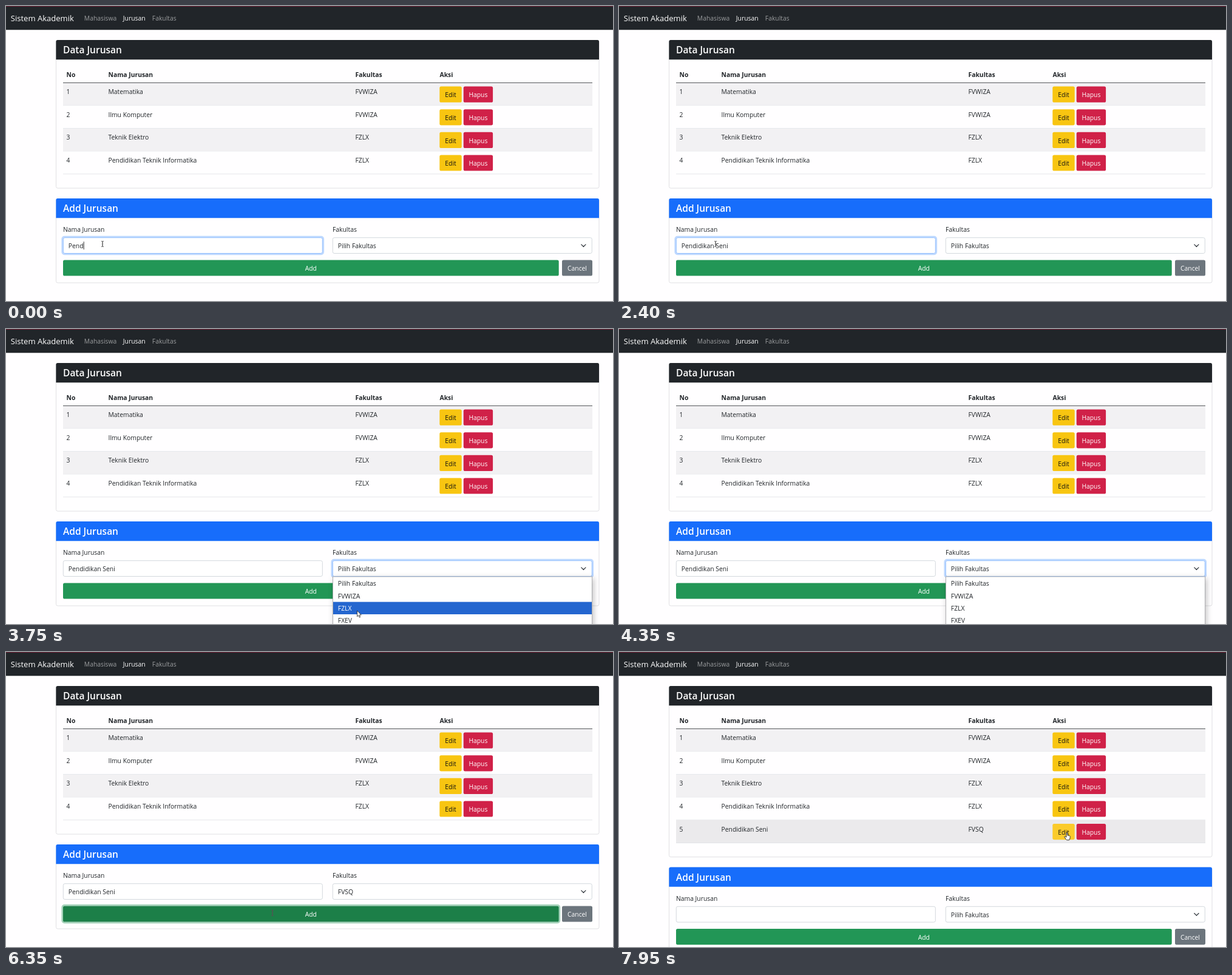
An HTML page for the animation above (8 s loop, 1000 px wide and 486 px high).

```html
<!DOCTYPE html>
<html lang="id">
<head>
<meta charset="utf-8">
<title>Sistem Akademik</title>
<style>
html, body { margin: 0; width: 100%; height: 100%; overflow: hidden; background: #fffeff; }
svg { display: block; font: 10.35px "Open Sans", "Noto Sans", sans-serif; fill: #212529; }
.menu { filter: drop-shadow(2px 3px 5px rgba(0, 0, 0, .25)); }
</style>
</head>
<body>
<svg id="stage" width="1000" height="486" viewBox="0 0 1000 486"></svg>
<script>
const LOOP = 8000;
const ROW = 37.6;
const TYPED = 'Pendidikan Seni';
const PROMPT = 'Pilih Fakultas';
const FACULTIES = [PROMPT, 'FVWIZA', 'FZLX', 'FXEV', 'FVSQ'];
const MAJORS = [
  ['Matematika', 1], ['Ilmu Komputer', 1], ['Teknik Elektro', 2],
  ['Pendidikan Teknik Informatika', 2], [TYPED, 4]
];

// Moments of the interaction, in ms
const OPEN = 3200, CHOOSE = 4650, SUBMIT = 5850, RELOAD = 6400;

// Pointer path: time, x, y
const PATH = [
  [0, 159, 392], [2550, 159, 392], [3150, 640, 396], [3350, 625, 402],
  [3700, 578.5, 464], [4050, 578.5, 464], [4500, 575, 502], [4700, 575, 502],
  [5400, 436, 434.5], [5900, 439, 430], [6850, 439, 430], [7550, 738, 297.5], [LOOP, 738, 297.5]
];

const stage = document.getElementById('stage');
const pen = document.createElement('canvas').getContext('2d');
pen.font = '10.35px "Open Sans", "Noto Sans", sans-serif';

const clamp = (v, lo = 0, hi = 1) => Math.min(hi, Math.max(lo, v));
const fade = (t, from, to) => clamp((t - from) / 150) - clamp((t - to) / 150);
const within = (p, x, y, w, h) => p.x >= x && p.x <= x + w && p.y >= y && p.y <= y + h;

function pointerAt(t) {
  const i = PATH.findIndex(k => k[0] > t);
  const [t0, x0, y0] = PATH[i - 1], [t1, x1, y1] = PATH[i];
  const u = (t - t0) / (t1 - t0), s = u * u * (3 - 2 * u);
  return { x: x0 + (x1 - x0) * s, y: y0 + (y1 - y0) * s };
}

const rect = (x, y, w, h, fill, extra = '') =>
  `<rect x="${x}" y="${y}" width="${w}" height="${h}" fill="${fill}" ${extra}/>`;
const text = (x, y, str, extra = '') => `<text x="${x}" y="${y}" ${extra}>${str}</text>`;
const button = (x, y, w, label, fill, color = '#fff') =>
  rect(x, y, w, 26.2, fill, 'rx="2.6"') +
  text(x + w / 2, y + 17.8, label, `fill="${color}" text-anchor="middle"`);
const ring = (x, y, w, h, color, opacity) => opacity <= 0 ? '' :
  rect(x - 1.2, y - 1.2, w + 2.4, h + 2.4, 'none',
    `rx="3.6" stroke="${color}" stroke-width="2.8" opacity="${opacity}"`);

function field(x, y, str, focus) {
  return ring(x, y, 427.5, 26.2, '#bfd9ff', focus) +
    rect(x + .3, y + .3, 427, 25.8, '#fff', `rx="2.6" stroke="${focus > .5 ? '#86b7fe' : '#ced4da'}" stroke-width=".9"`) +
    text(x + 8.8, y + 17.7, str);
}

function card(y, h, title, color) {
  return rect(82.5, y + .5, 894.5, h, '#fffeff', 'rx="2.8" stroke="#dddde0" stroke-width=".9"') +
    `<path d="M82.4 ${y + 32.2}v-29.4q0-2.8 2.8-2.8h889q2.8 0 2.8 2.8v29.4z" fill="${color}"/>` +
    text(94, y + 22.4, title, 'fill="#fff" font-size="15.5" font-weight="600"');
}

function navbar() {
  return rect(0, 0, 1000, 39.3, '#212529') + rect(0, 0, 1000, 1, '#6b1f33') +
    text(7.8, 25, 'Sistem Akademik', 'fill="#fff" font-size="13.05"') +
    text(128.8, 24.2, 'Mahasiswa', 'fill="#9b9d9f"') +
    text(192.8, 24.2, 'Jurusan', 'fill="#fff"') +
    text(240.8, 24.2, 'Fakultas', 'fill="#9b9d9f"');
}

function table(rows, p) {
  const heads = [[99.5, 'No'], [168.5, 'Nama Jurusan'], [575.5, 'Fakultas'], [714.5, 'Aksi']];
  let out = card(56, 94 + rows * ROW - .8, 'Data Jurusan', '#212529');
  out += heads.map(([x, s]) => text(x, 117.2, s, 'font-weight="700"')).join('');
  MAJORS.slice(0, rows).forEach(([name, faculty], i) => {
    const y = 126.7 + i * ROW;
    const hover = within(p, 94, y, 872, ROW);
    const fill = hover ? '#ebeaec' : i % 2 ? '#fffeff' : '#f2f1f3';
    const edit = within(p, 714.5, y + 6, 36.2, 26) ? '#fbcb2b' : '#f8c511';
    out += rect(94, y, 872, ROW, fill) + rect(94, y + ROW - .7, 872, .8, '#dee2e6') +
      text(99.5, y + 18.5, i + 1) + text(168.5, y + 18.5, name) +
      text(575.5, y + 18.5, FACULTIES[faculty]) +
      button(714.3, y + 5.9, 36.4, 'Edit', edit, '#111') +
      button(753.7, y + 5.9, 48.4, 'Hapus', '#d02148');
  });
  return out + rect(94, 126, 872, 1, '#55585b');
}

function form(y, t) {
  const fresh = t >= RELOAD;
  const count = Math.min(TYPED.length, 4 + Math.floor(t / 137));
  const value = fresh ? '' : TYPED.slice(0, count);
  const inputFocus = fade(t + 150, 0, OPEN + 50);
  const selectFocus = fresh ? 0 : fade(t, OPEN - 50, SUBMIT);
  const pressed = fresh ? 0 : fade(t, SUBMIT, LOOP);
  const hover = fresh ? 0 : fade(t, 5360, LOOP);
  const shade = (a, b) => Math.round(a + (b - a) * hover);
  const green = `rgb(${shade(34, 28)},${shade(150, 127)},${shade(86, 72)})`;
  const choice = t >= CHOOSE && !fresh ? FACULTIES[4] : PROMPT;
  const typing = count < TYPED.length;
  const caret = t < OPEN - 100 && (typing || Math.floor((t - 1507) / 500) % 2 === 0);

  return card(y, 138.5, 'Add Jurusan', '#176dfb') +
    text(94, y + 55.3, 'Nama Jurusan') + text(538, y + 55.3, 'Fakultas') +
    field(94, y + 64.4, value, inputFocus) +
    (caret ? rect(103 + pen.measureText(value).width, y + 71.2, .9, 13, '#222') : '') +
    field(538, y + 64.4, choice, selectFocus) +
    `<path d="M947.8 ${y + 75.9}l3.6 3.6l3.6-3.6" fill="none" stroke="#343a40" stroke-width="1.3" stroke-linecap="round"/>` +
    ring(94, y + 101.4, 816.7, 26.2, '#a6d3bb', pressed) +
    button(94, y + 101.4, 816.7, 'Add', green) +
    button(916, y + 101.4, 50, 'Cancel', '#6c757d');
}

function menu(p) {
  const hovered = clamp(Math.floor((p.y - 408.8) / 20.4), 0, 4);
  return `<g class="menu">${rect(538.5, 408, 427, 104, '#fff', 'stroke="#a8a8ac" stroke-width=".9"')}</g>` +
    FACULTIES.map((name, i) => {
      const y = 408.8 + i * 20.4, on = i === hovered;
      return (on ? rect(539, y, 426, 20.4, '#2466cf') : '') +
        text(546.8, y + 14.4, name, on ? 'fill="#fff"' : '');
    }).join('');
}

function cursor(p, kind) {
  const shapes = {
    beam: '<path d="M-2-4.5h1.3q.7 0 .7.7v7.6q0 .7-.7.7h-1.3M2-4.5h-1.3q-.7 0-.7.7v7.6q0 .7.7.7h1.3" fill="none" stroke="#555" stroke-width=".9"/>',
    arrow: '<path d="M0 0v9.8l2.2-2.1 1.5 3.5 1.5-.7-1.5-3.4h3.1z" fill="#fff" stroke="#222" stroke-width=".8"/>',
    hand: '<path d="M-1 1a1 1 0 0 1 2 0v3.6l3.4.8q1 .3.9 1.4l-.6 3.8q-.3 1.7-1.6 1.7h-3q-.9 0-1.4-.8l-2.7-4q-.5-1 .4-1.3.9-.1 2.6 1.5z" fill="#fff" stroke="#222" stroke-width=".9"/>'
  };
  return `<g transform="translate(${p.x.toFixed(1)} ${p.y.toFixed(1)})">${shapes[kind]}</g>`;
}

function scene(t) {
  const p = pointerAt(t);
  const rows = t < RELOAD ? 4 : 5;
  const top = 317 + (rows - 4) * ROW;
  const open = t >= OPEN && t < CHOOSE;
  const onButton = within(p, 94, top + 101, 817, 26.5) || within(p, 714, 283, 36.5, 26);
  const onInput = within(p, 94, top + 64, 428, 26.5) || (t >= 6330 && t < RELOAD);
  const kind = open ? 'arrow' : onInput ? 'beam' : onButton ? 'hand' : 'arrow';
  return navbar() + table(rows, p) + form(top, t) + (open ? menu(p) : '') + cursor(p, kind);
}

let shown = '';
function draw(now) {
  const next = scene(now % LOOP);
  if (next !== shown) stage.innerHTML = shown = next;
  requestAnimationFrame(draw);
}
draw(0);
</script>
</body>
</html>
```
